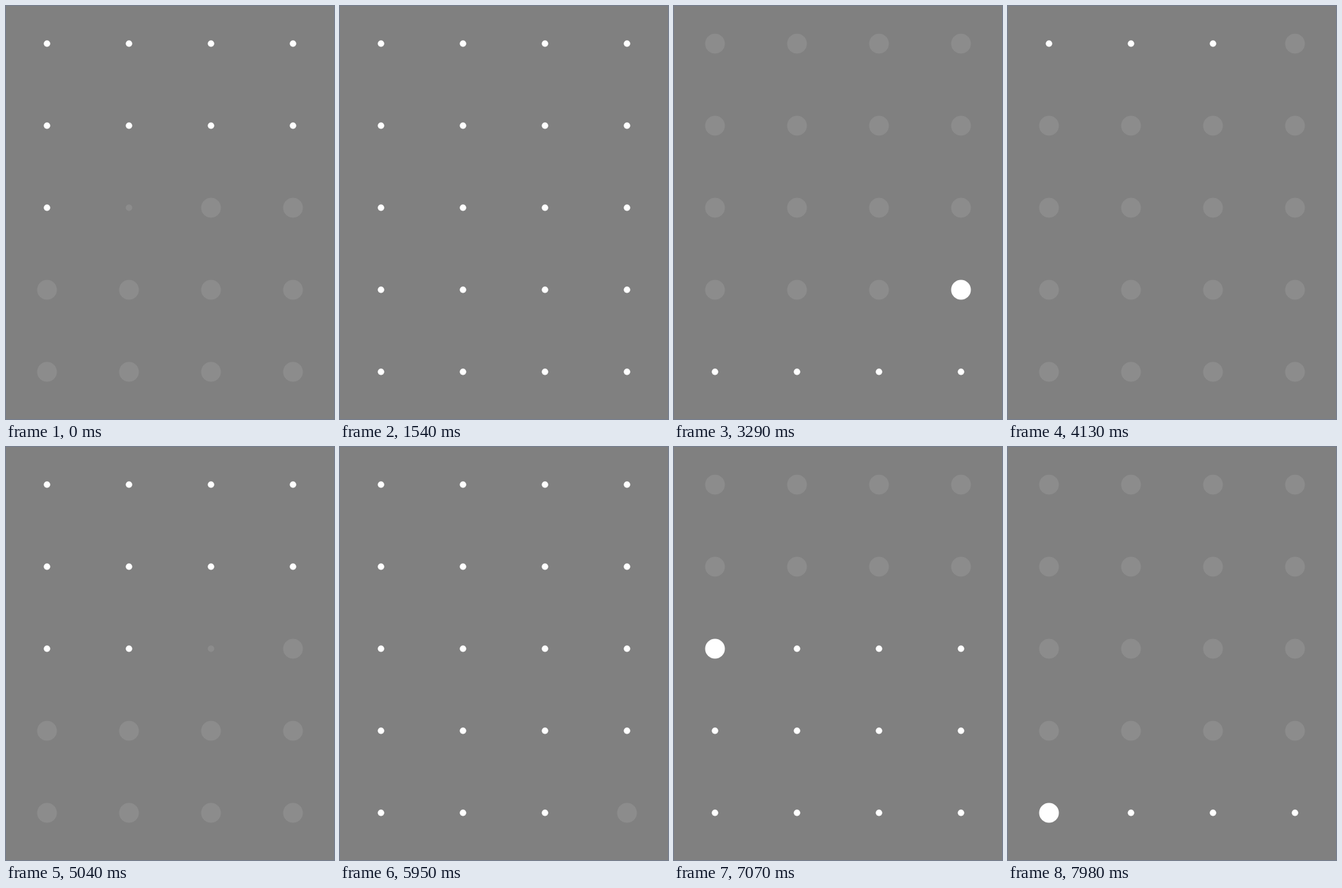
Animation, 480 px wide and 604 px high, one loop 8000 ms. Source, as an HTML page:

```html
<!DOCTYPE html>
<html lang="en">
<head>
<meta charset="utf-8">
<title>Dot grid</title>
<style>
  html, body { margin: 0; width: 100%; height: 100%; overflow: hidden; background: #808080; }
  svg { display: block; width: 480px; height: 604px; }
</style>
</head>
<body>
<svg id="stage" viewBox="0 0 480 604" xmlns="http://www.w3.org/2000/svg"></svg>
<script>
const LOOP = 8000, TICK = 70, DOTS = 20, COLS = 4, GAP = 120;
const BIG = 14.45, SMALL = 4.75, WHITE = '#fff', DIM = '#8c8c8c';

// Key points [ms, half-steps done]; a dot takes two half-steps: size, then colour.
const PACE = [
  [0, 19.5], [910, 28], [1540, 40], [4130, 86],
  [4550, 92], [5950, 118.8], [6300, 122.9], [LOOP, 154.3]
];

const stage = document.getElementById('stage');
const dots = Array.from({ length: DOTS }, (_, i) => {
  const dot = document.createElementNS(stage.namespaceURI, 'circle');
  dot.setAttribute('cx', 60 + GAP * (i % COLS));
  dot.setAttribute('cy', 55 + GAP * Math.floor(i / COLS));
  return stage.appendChild(dot);
});

function stepsAt(t) {
  const k = PACE.findIndex(p => p[0] > t);
  const [t0, n0] = PACE[k - 1], [t1, n1] = PACE[k];
  return Math.floor(n0 + (n1 - n0) * (t - t0) / (t1 - t0));
}

function draw(ms) {
  const t = Math.floor((ms % LOOP) / TICK) * TICK;
  const steps = stepsAt(t), sweep = 2 * DOTS;
  const lighting = Math.floor(steps / sweep) % 2 === 0;
  const done = steps % sweep;
  dots.forEach((dot, i) => {
    const small = (done > 2 * i) === lighting;
    const white = (done > 2 * i + 1) === lighting;
    dot.setAttribute('r', small ? SMALL : BIG);
    dot.setAttribute('fill', white ? WHITE : DIM);
  });
}

const start = performance.now();
function frame() {
  draw(performance.now() - start);
  requestAnimationFrame(frame);
}
draw(0);
requestAnimationFrame(frame);
</script>
</body>
</html>
```
